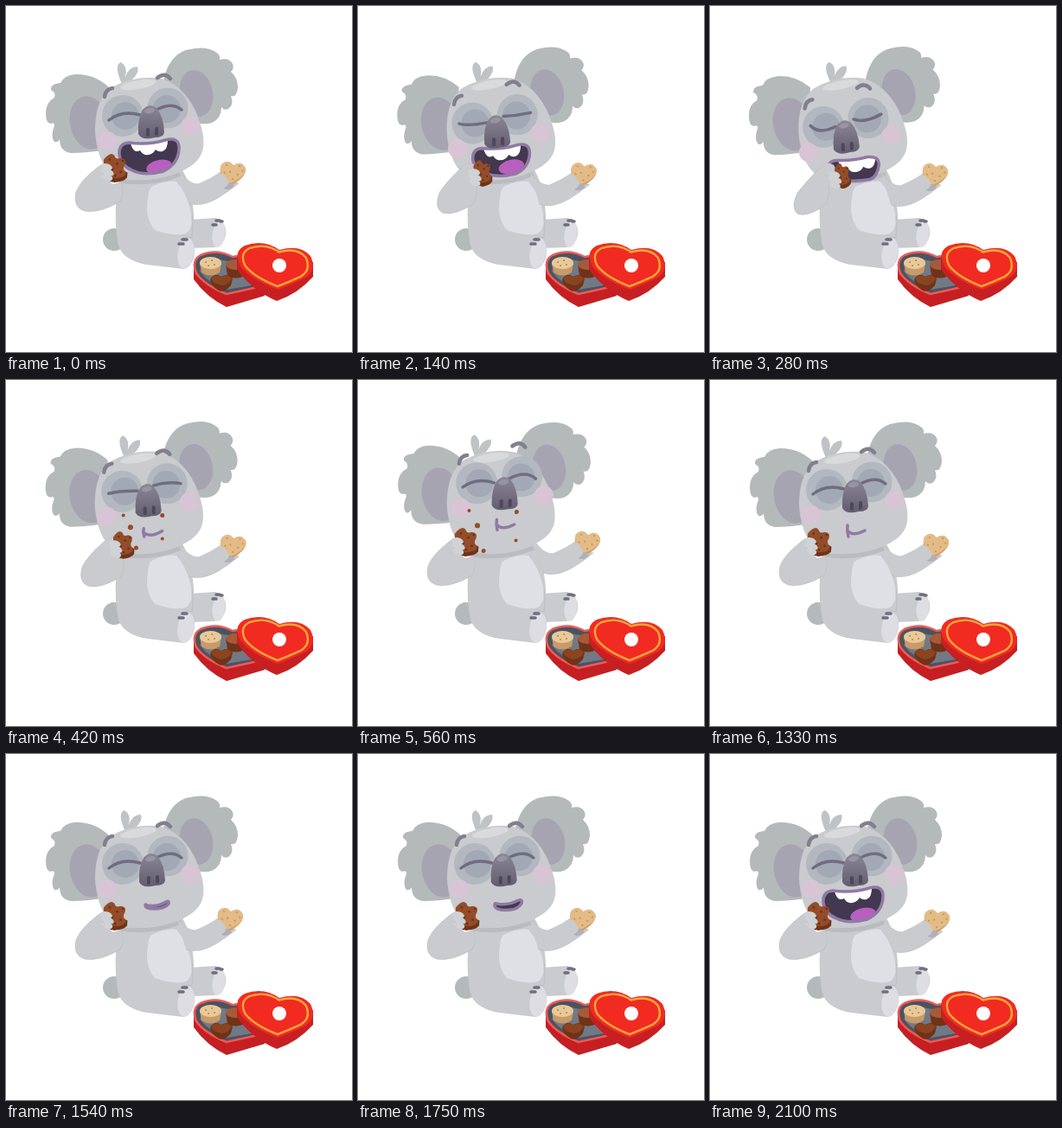
Write an HTML page that moves like this. It is 400x400 px and loops after 2.17 s.

```html
<!DOCTYPE html>
<html lang="en">
<head>
<meta charset="utf-8">
<title>Koala with cookies</title>
<style>
html, body { margin: 0; width: 100%; height: 100%; overflow: hidden; background: #fff; }
svg { display: block; width: 100%; height: 100%; }
.line { fill: none; stroke: #716d7e; stroke-width: 3.5; stroke-linecap: round; stroke-linejoin: round; }
.brow { stroke-width: 4.5; stroke: #827f8e; }
.lip { stroke: #9179a4; }
.fur { fill: #c9cbce; }
.pale { fill: #dddde3; }
.ear { fill: #b4b9ba; }
.inner { fill: #a6a4b0; }
.patch { fill: #b3b8c0; }
.lid { fill: #a2a8b4; }
.cheek { fill: #d9c4d5; }
.choc { fill: #944c29; }
.dark { fill: #703319; }
</style>
</head>
<body>
<svg viewBox="0 0 400 400">
  <defs>
    <clipPath id="mouthClip"><path id="clipShape"/></clipPath>
    <path id="heartLid" d="M314 328Q283 316 271 301Q262 284 276 277Q298 269 316 282Q340 275 352 289Q360 306 345 315Q330 322 314 328Z"/>
    <linearGradient id="noseTone" x2="0" y2="1">
      <stop stop-color="#8a8796"/><stop offset="1" stop-color="#625d6e"/>
    </linearGradient>
  </defs>

  <!-- body -->
  <circle class="ear" cx="125" cy="270" r="13"/>
  <path class="fur" d="M212 247L242 245Q256 251 254 265Q251 278 240 279L214 280Z"/>
  <ellipse class="pale" cx="246" cy="264" rx="7.5" ry="15" transform="rotate(8 246 264)"/>
  <path class="line" stroke-width="3" d="M239 253h4M243 248h4M248 249h2"/>
  <path class="fur" d="M132 196Q123 235 129 273Q133 294 163 299L205 304Q219 300 218 280L217 240Q214 205 202 186Z"/>
  <path d="M133 202Q168 208 203 194" fill="none" stroke="#b9bbc0" stroke-width="5"/>
  <path fill="#dfe0e5" d="M168 209Q185 201 197 203Q208 215 213 235Q218 257 208 263Q195 267 172 259Q160 245 164 222Q165 212 168 209Z"/>
  <path d="M215 243Q217 257 215 268Q205 265 199 274" fill="none" stroke="#bcbec4"/>
  <ellipse class="pale" cx="208" cy="286" rx="9.5" ry="18" transform="rotate(8 208 286)"/>
  <path class="line" d="M200 275h5M204 270h5"/>

  <g id="rightArm">
    <path class="fur" stroke="#bcbec4" stroke-width=".7" d="M200 190Q211 206 222 206Q237 200 248 192L262 204L269 205Q258 214 245 222Q226 233 211 228"/>
    <g transform="translate(262 192) rotate(8)">
      <path fill="#d0a369" d="M0 16Q-18 4 -14 -6L14 -7Q18 3 0 16Z"/>
      <path fill="#e3bb87" d="M-1 13Q-18 2 -14 -7Q-8 -15 0 -8Q8 -15 14 -7Q18 2 -1 13Z"/>
      <path fill="none" stroke="#c8955b" stroke-width="2.2" stroke-linecap="round" d="M-8 -7h.1M7 -8h.1M-3 0h.1M6 2h.1M-9 2h.1M11 -3h.1M1 8h.1"/>
    </g>
    <path fill="#b0afba" d="M252 205Q260 202 264 208Q258 214 252 211Z"/>
    <path class="fur" d="M246 199Q246 191 251 194L258 203Q255 212 247 211Z"/>
  </g>

  <!-- head -->
  <g id="head">
    <path class="ear" d="M118 93Q101 78 80 79Q67 80 63 89Q51 90 52 97Q58 100 56 106Q46 111 46 124Q46 136 52 136Q56 134 56 138Q51 151 56 157Q60 158 62 154Q62 168 75 170Q90 170 112 167Z"/>
    <ellipse class="inner" cx="96" cy="135" rx="22" ry="31" transform="rotate(-12 96 135)"/>
    <path class="ear" d="M182 86Q188 58 208 51Q230 45 242 53Q248 56 247 62Q258 59 262 67Q264 72 260 76Q268 83 268 94Q267 106 260 104Q264 114 257 119Q252 121 249 117Q249 130 238 135Q228 138 216 134Z"/>
    <ellipse class="inner" cx="220" cy="101" rx="19" ry="27" transform="rotate(-12 220 101)"/>
    <path id="tuft" fill="#bfc3c6" d="M134 90Q124 68 133 65Q141 70 138 82Q142 70 152 70Q155 77 144 87Q139 91 134 90Z"/>
    <path class="fur" d="M103 143Q103 108 122 94Q150 79 180 84Q205 92 219 121Q232 151 227 168Q222 184 198 193Q165 203 137 201Q116 196 108 172Q103 156 103 143Z"/>
    <ellipse fill="#d8dadc" cx="153" cy="91" rx="21" ry="5" transform="rotate(-10 153 91)"/>
    <g id="face">
      <circle class="patch" cx="135" cy="127" r="24"/>
      <circle class="lid" cx="138" cy="127" r="16"/>
      <circle class="patch" cx="187" cy="118" r="23.5"/>
      <circle class="lid" cx="186" cy="119" r="16"/>
      <path class="line brow" d="M114 105Q115 96 123 95M175 83Q184 76 190 84"/>
      <circle class="cheek" cx="117" cy="156" r="11"/>
      <circle class="cheek" cx="213" cy="139" r="11"/>
      <path id="eyes" class="line"/>
      <path id="chew" class="line lip" stroke-width="4"/>
    </g>
    <g id="mouth">
      <path id="cavity" fill="#42384f"/>
      <g clip-path="url(#mouthClip)">
        <ellipse id="tongue" fill="#b85fc0" cx="177" cy="186" rx="15" ry="8" transform="rotate(-12 177 186)"/>
        <path id="teeth" fill="#fff" d="M143 154L187 150Q188 166 181 168Q176 169 173 166Q169 173 161 172Q157 171 155 167Q146 172 143 154Z"/>
      </g>
      <path id="lips" class="line lip"/>
    </g>
    <g id="nose">
      <path fill="url(#noseTone)" d="M153 148Q152 129 158 120Q166 111 174 118Q182 127 183 146Q182 152 172 152Q157 156 153 148Z"/>
      <ellipse fill="#9895a2" cx="166" cy="121" rx="6" ry="3" transform="rotate(-12 166 121)"/>
      <path fill="none" stroke="#4d4759" stroke-width="4" stroke-linecap="round" d="M164 143v6M174 142v6"/>
    </g>
    <g id="crumbs" class="choc"></g>
  </g>

  <!-- feeding arm -->
  <path id="leftArm" class="fur" stroke="#bcbec4" stroke-width=".7"/>
  <g id="cookie">
    <path class="dark" d="M-12 -9L-13 7Q-8 16 2 17Q13 15 16 10V4Z"/>
    <path class="choc" d="M-13 -8Q-6 -19 -1 -14Q1 -9 6 -12Q14 -12 12 -5Q9 0 14 4Q15 10 2 12Q-12 12 -13 -8Z"/>
    <path fill="none" stroke="#65301b" stroke-width="2.5" stroke-linecap="round" d="M-6 -9h.1M3 -5h.1M-2 2h.1M8 4h.1M9 -9h.1M2 9h.1"/>
  </g>
  <g id="fingers" fill="#d0d2d5">
    <ellipse cx="-9" cy="-1" rx="7" ry="3.8" transform="rotate(12 -9 -1)"/>
    <ellipse cx="-8" cy="5" rx="8" ry="4" transform="rotate(20 -8 5)"/>
    <ellipse cx="-8" cy="11" rx="6.5" ry="4" transform="rotate(20 -8 11)"/>
  </g>

  <!-- cookie box -->
  <path fill="#c51f23" d="M217 299V316Q232 337 255 348L299 335V310Z"/>
  <path fill="#4c5360" stroke="#ef5a55" stroke-width="2.5" d="M255 333Q230 323 220 309Q214 294 225 288Q243 280 262 290Q282 286 298 298L300 323Z"/>
  <path fill="#717985" d="M255 328Q232 319 224 306L240 292L285 300L290 322Z"/>
  <path fill="#c89b67" d="M224 297L226 308Q236 315 247 308L249 297Z"/>
  <ellipse fill="#e8c999" cx="236.500" cy="297" rx="12.500" ry="7"/>
  <path fill="none" stroke="#b98753" stroke-width="2" stroke-linecap="round" d="M231 296h.1M238 294h.1M241 299h.1M234 300h.1"/>
  <path class="dark" d="M254 299L256 311Q265 318 277 311V298Z"/>
  <ellipse fill="#a65a39" cx="265" cy="299" rx="11" ry="6"/>
  <path class="dark" d="M236 316Q241 308 249 313Q257 308 262 315L260 323Q252 332 246 329Q237 324 236 316Z"/>
  <path fill="#8a441f" d="M237 315Q242 309 249 313Q257 309 261 315Q257 323 249 323Q239 321 237 315Z"/>
  <path fill="#c81f22" d="M267 290V304Q283 328 313 341Q337 333 355 313V296Z"/>
  <use href="#heartLid" fill="#f12b22"/>
  <use href="#heartLid" fill="none" stroke="#f7a63c" stroke-width="2.800" transform="translate(313 300) scale(.86) translate(-313 -300)"/>
  <circle cx="316" cy="300" r="8" fill="#fff"/>
</svg>
<script>
const LOOP = 2170, STEP = 70;
const $ = id => document.getElementById(id);
const set = (id, name, value) => $(id).setAttribute(name, value);
const move = (id, x, y, extra = '') => set(id, 'transform', `translate(${x} ${y}) ${extra}`);
const show = (id, on) => set(id, 'visibility', on ? 'visible' : 'hidden');
const mix = (a, b, k) => a.map((v, i) => v + (b[i] - v) * k);

// First pair is the start, every following four numbers are one quadratic curve.
function curve(p, end = 'Z') {
  let d = `M${p[0]} ${p[1]}`;
  for (let i = 2; i < p.length; i += 4) d += `Q${p.slice(i, i + 4).join(' ')}`;
  return d + end;
}

// Eased value from alternating times and values.
function key(t, ...k) {
  if (t <= k[0]) return k[1];
  for (let i = 2; i < k.length; i += 2) {
    if (t <= k[i]) {
      const u = (t - k[i - 2]) / (k[i] - k[i - 2]);
      return k[i - 1] + (k[i + 1] - k[i - 1]) * u * u * (3 - 2 * u);
    }
  }
  return k[k.length - 1];
}

const armRest = [104,188, 86,202, 81,215, 77,233, 91,237, 108,240, 132,226, 138,215, 133,203, 126,208, 120,205, 128,198, 122,184, 112,180, 104,188];
const armBite = [126,188, 112,202, 101,216, 93,233, 101,240, 112,245, 134,230, 140,215, 137,206, 140,206, 142,206, 150,198, 143,184, 132,178, 126,188];
const mouthOpen = [131,172, 130,159, 142,158, 165,161, 184,155, 200,151, 200,164, 200,182, 182,191, 160,197, 146,190, 132,184, 131,172];
const mouthBite = [136,185, 138,177, 148,178, 165,179, 182,175, 195,174, 195,184, 193,198, 184,201, 164,204, 148,200, 136,194, 136,185];
const mouthSmile = [161,175, 161,173, 163,175, 175,177, 185,171, 189,169, 188,173, 186,176, 180,178, 170,180, 164,178, 161,177, 161,175];
const eyesRest = [[119,132, 134,120, 155,126], [172,121, 191,110, 203,120]];
const eyesBite = [[120,125, 129,136, 149,127], [170,119, 183,124, 202,114]];
const chewLeft = [[159,168, 158,174, 160,181], [160,175, 165,181, 179,174]];
const chewRight = [[161,172, 160,174, 161,177], [161,175, 171,181, 184,171]];
const strokes = (a, b, k) => a.map((p, i) => curve(mix(p, b[i], k), '')).join('');

const crumbs = [[129,157], [184,157], [139,174], [184,190], [147,203]].map(([x, y], i) => {
  const c = document.createElementNS('http://www.w3.org/2000/svg', 'circle');
  $('crumbs').append(c);
  return { c, x, y, r: 2 + i % 3 * .5 };
});

function draw(t) {
  const bite = key(t, 0, 0, 230, 1, 320, 1, 490, 0);
  const up = key(t, 350, 0, 520, 1, 580, 1, 800, 0);
  const smile = key(t, 1400, 0, 1540, 1, 1680, 1, 1900, 0);
  const calm = key(t, 560, 0, 840, 1, 1750, 1, 2100, 0);

  move('head', -up, -up, `rotate(${1.5 * (up - bite)} 165 170)`);
  move('tuft', 8 * bite + 4 * smile, -bite);
  move('face', -3 * bite + 2 * up, 12 * bite - 6 * up);
  move('nose', -10 * bite + 2 * up + smile, 17 * bite - 2 * up);
  move('rightArm', 3 * up - 2 * bite - calm - 2 * smile, 2 * bite - 5 * up - 2 * calm);
  set('eyes', 'd', strokes(eyesRest, eyesBite, bite));

  const chewing = t >= 420 && t < 1470;
  const sway = .5 - .5 * Math.cos((t - 840) / 245 * 2 * Math.PI);
  set('chew', 'd', strokes(chewLeft, chewRight, sway * .75));
  show('chew', chewing);
  show('mouth', !chewing);

  const snap = key(t, 70, 0, 260, 1);
  const open = key(t, 1680, 0, 2030, 1);
  const late = t > 1000;
  const shape = curve(late ? mix(mouthSmile, mouthOpen, open) : mix(mouthOpen, mouthBite, snap));
  for (const id of ['cavity', 'lips', 'clipShape']) set(id, 'd', shape);
  move('teeth', late ? 0 : 4 * snap, late ? 14 * (1 - open) : 20 * snap);
  show('teeth', !chewing && (!late || open > .2));
  show('tongue', !chewing && (late ? open > .3 : snap < .5));

  set('leftArm', 'd', curve(mix(armRest, armBite, bite)));
  const [x, y] = mix([125, 187], [152, 196], bite);
  const lift = up - bite * .5;
  move('cookie', x - lift, y, `scale(${1 - .35 * bite} ${1 - .1 * bite}) rotate(${6 - 6 * bite})`);
  move('fingers', x - lift, y);

  const spread = key(t, 280, .3, 490, 1);
  const size = t < 350 ? 0 : key(t, 630, 1, 800, 0);
  const fall = key(t, 560, 0, 800, 8);
  for (const { c, x, y, r } of crumbs) {
    c.setAttribute('cx', 168 + (x - 168) * spread);
    c.setAttribute('cy', 174 + (y - 178) * spread + fall);
    c.setAttribute('r', r * size);
  }
}

function tick() {
  draw(Math.floor(performance.now() % LOOP / STEP) * STEP);
  requestAnimationFrame(tick);
}
tick();
</script>
</body>
</html>
```
